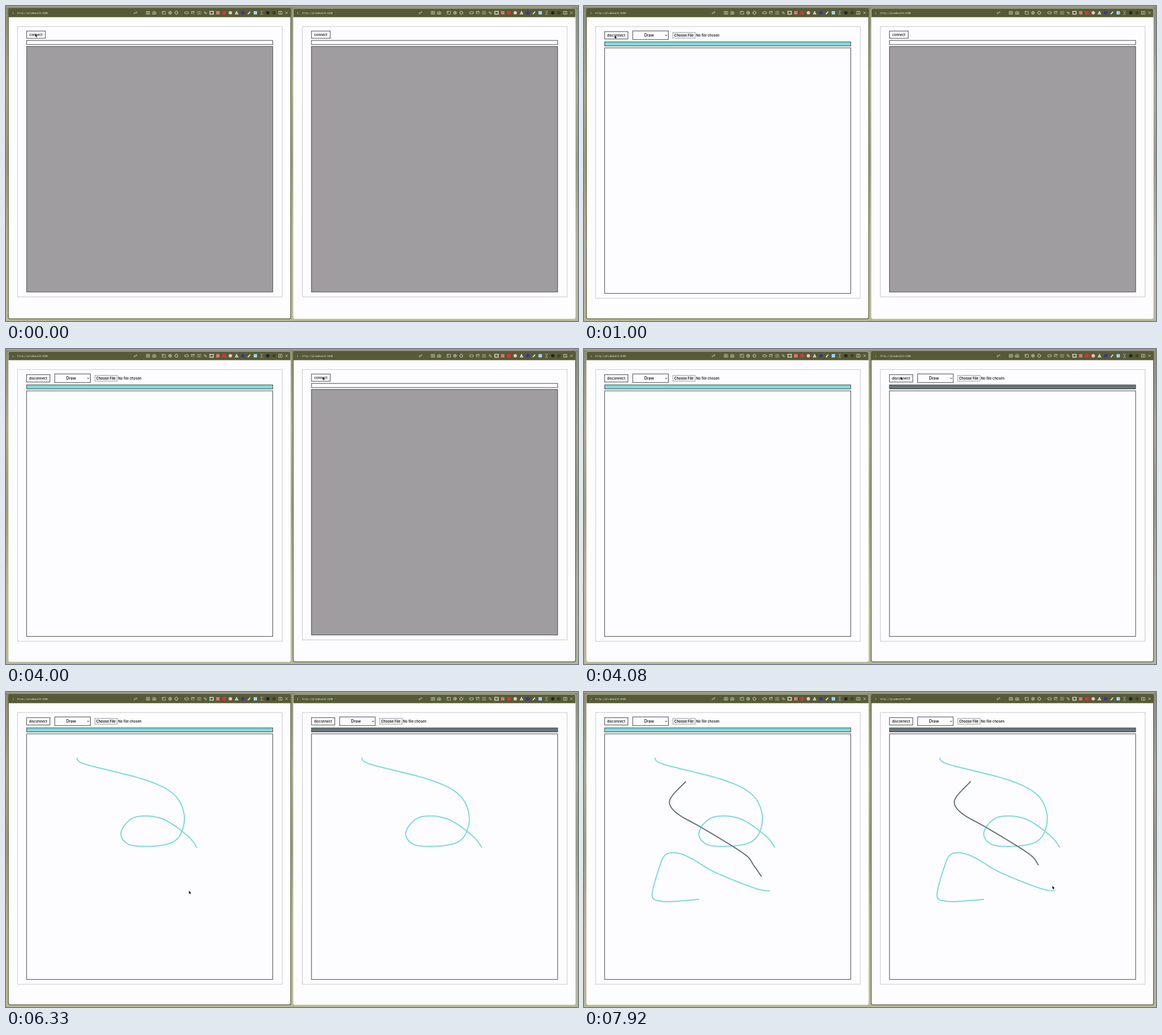
These frames come from a looping animation (1007 by 556 pixels, 8 s). An HTML page with a canvas:

```html
<!DOCTYPE html>
<html lang="en">
<head>
<meta charset="utf-8">
<title>Shared drawing board</title>
<style>
html, body { margin: 0; width: 100%; height: 100%; overflow: hidden; background: #fdfcfe; }
canvas { display: block; width: 1007px; height: 556px; }
</style>
</head>
<body>
<canvas id="stage"></canvas>
<script>
const W = 1007, H = 556, LOOP = 8000, STEP = 250 / 3, SHIFT = 501.5;
const TEAL = '#7edad8', SLATE = '#66747b', OLIVE = '#565a37', PAPER = '#fdfcfe', GREY = '#9f9d9f';
const JOIN = [410, 4080];
const REMOTE_LAG = 55, LOCAL_LAG = 115;
const SANS = 'Inter, sans-serif', MONO = '"DejaVu Sans Mono", monospace';

const canvas = document.getElementById('stage');
const ctx = canvas.getContext('2d');
const ratio = window.devicePixelRatio || 1;
canvas.width = W * ratio;
canvas.height = H * ratio;

const clamp = v => Math.max(0, Math.min(1, v));
const ease = v => v * v * (3 - 2 * v);
const mix = (a, b, v) => a + (b - a) * v;

// Smooth strokes through a few points, evenly spaced in time
const strokes = [
  { owner: 0, start: 5105, end: 6030, points: [
    [124.5, 116.5], [141, 127.5], [243, 154], [295, 180], [313.5, 217], [305, 254], [277, 269.5],
    [220, 270], [202, 248], [226, 220.8], [274, 223], [319, 253], [335.5, 273.5]] },
  { owner: 0, start: 6318, end: 6820, points: [
    [326, 350.5], [301, 346], [232, 318.5], [190, 294], [165, 284], [143, 287],
    [131, 313], [119.7, 359], [135, 368.6], [160, 369], [201.5, 365.5]] },
  { owner: 1, start: 7150, end: 7917, points: [
    [178.5, 158], [154, 184], [151.5, 200], [168, 217], [207, 239], [280, 284],
    [299, 306], [322.7, 341.7]] }
];

const progress = (s, time) => clamp((time - s.start) / (s.end - s.start)) * (s.points.length - 1);

// Catmull-Rom position at u, counted in points
function along({ points }, u) {
  const last = points.length - 1, i = Math.min(Math.floor(u), last - 1), v = u - i;
  const at = k => points[Math.max(0, Math.min(last, k))];
  const [a, b, c, d] = [at(i - 1), at(i), at(i + 1), at(i + 2)];
  return [0, 1].map(k => b[k] + v / 2 * (c[k] - a[k]
    + v * (2 * a[k] - 5 * b[k] + 4 * c[k] - d[k] + v * (3 * (b[k] - c[k]) + d[k] - a[k]))));
}

function penAt(stroke, time) {
  const [x, y] = along(stroke, progress(stroke, time));
  return [x + stroke.owner * SHIFT, y];
}

// Pointer stops: time, x, y
const stops = [[250, 51, 48.5], [900, 53.5, 51.5], [1500, 53.5, 51.5],
  [2750, 567, 34.5], [3800, 557, 48.5], [4250, 557, 48.5]];
for (const s of strokes) for (const time of [s.start, s.end]) stops.push([time, ...penAt(s, time)]);

function pointer(time) {
  const pen = strokes.find(s => time >= s.start && time <= s.end);
  if (pen) return penAt(pen, time);
  const next = stops.findIndex(s => s[0] > time);
  const b = next < 0 ? stops[stops.length - 1] : stops[next];
  const a = next > 0 ? stops[next - 1] : b;
  const v = a === b ? 0 : ease((time - a[0]) / (b[0] - a[0]));
  return [mix(a[1], b[1], v), mix(a[2], b[2], v)];
}

function rect(x, y, w, h, fill, line, width = 1) {
  if (fill) { ctx.fillStyle = fill; ctx.fillRect(x, y, w, h); }
  if (line) { ctx.strokeStyle = line; ctx.lineWidth = width; ctx.strokeRect(x, y, w, h); }
}

function label(text, x, y, { size = 6, color = '#000', align = 'left', font = SANS, weight = 500 } = {}) {
  ctx.font = `${weight} ${size}px ${font}`;
  ctx.textAlign = align;
  ctx.fillStyle = color;
  ctx.fillText(text, x, y);
}

function trace(d, x, y, color, width) {
  ctx.save();
  ctx.translate(x, y);
  ctx.strokeStyle = color;
  ctx.lineWidth = width;
  ctx.stroke(new Path2D(d));
  ctx.restore();
}

// Toolbar icons, each drawn around (x, 12)
const line = (d, color = '#d5d7c5', width = .75) => x => trace(d, x, 12, color, width);
const square = color => x => rect(x - 3, 9, 6, 6, color);
const dot = color => x => {
  ctx.fillStyle = color;
  ctx.beginPath();
  ctx.arc(x, 12, 3, 0, 7);
  ctx.fill();
};
const BOX = 'M-3-2.5H3V2.5H-3Z', RING = 'M2.7 0A2.7 2.7 0 1 1-2.7 0A2.7 2.7 0 1 1 2.7 0';
const iconRows = [
  [228, [line('M-.5 1L-1.5 2Q-3 2-2.5.5L-1-1M.5-1L1.5-2Q3-2 2.5-.5L1 1M-1 1L1-1')]],
  [250, [line(BOX + 'M-1-1H1V1H-1Z'), line('M-3-1.5H-1.5L-1-2.5H1L1.5-1.5H3V2.5H-3ZM-1-.5H1V1.2H-1Z')]],
  [278, [line(BOX + 'M-3-1.3H0'), line(RING + 'M-2.7 0H2.7M0-2.7V2.7'),
    line(RING + 'M0-3.5V-1.5M0 3.5V1.5M-3.5 0H-1.5M3.5 0H1.5')]],
  [318, [line('M-2-2H2V-1H3.5V1H2V2H-2V1H-3.5V-1H-2Z'), line('M-2.5-2.5H2.5V0M-2.5-2.5V1.5H0M-1-1H2M1 2H3'),
    line(BOX + 'M-1.5-1H1.5M-1.5 0H1.5M-1.5 1H1.5', '#a6a98e'), line('M-2.5-1L-1-2.5L2.5 1L1 2.5ZM-1 0L0-1M0 1L1 0'),
    line(BOX, '#d9d8ca', 1.5), square('#d77874'), square('#d93535'), dot('#efc3bd'),
    line('M-2 2L0-2L2 2Z', '#deded3', 1.5), dot('#3a329e'), line('M-2.2 2.5L2-2', '#eeeef5', 1.8),
    square('#9cd4ea'), line('M-2.5-3H2.5M-2.5 3H2.5M-1.5-2.5L1.5 2.5M1.5-2.5L-1.5 2.5', '#a6a98e'),
    dot('#25271f'), dot('#3f432a'), line(BOX + 'M0-2.5V2.5'), line('M-2.2-2.2L2.2 2.2M2.2-2.2L-2.2 2.2')]]
];

function titleBar() {
  rect(4, 4, 498, 15.7, OLIVE);
  const style = { size: 4.28, color: '#f0f0e6', font: MONO, weight: 400 };
  label('i', 11, 13.8, style);
  label('http://plumboard:4100', 20, 13.8, style);
  for (const [x, row] of iconRows) row.forEach((icon, i) => icon(x + 11 * i));
  for (const x of [270, 307.5]) rect(x, 9, .6, 6, '#6d714d');
}

function drawStroke(stroke, time) {
  if (time <= stroke.start) return;
  const end = progress(stroke, time);
  ctx.strokeStyle = stroke.owner ? SLATE : TEAL;
  ctx.lineWidth = 2;
  ctx.beginPath();
  for (let u = 0; u < end; u += .125) ctx.lineTo(...along(stroke, u));
  ctx.lineTo(...along(stroke, end));
  ctx.save();
  ctx.lineCap = ctx.lineJoin = 'round';
  ctx.stroke();
  ctx.restore();
}

function board(side, joined, time) {
  const edge = '#48484a', drop = joined ? 2.5 : 0, mid = { align: 'center' };
  rect(20, 35.7, 466, 477.2 + drop, null, '#c3c2c5', .9);
  if (joined) {
    rect(36, 44.7, 41, 13, PAPER, edge);
    label('disconnect', 56.4, 53.4, mid);
    rect(85.5, 43.5, 62.7, 15.2, PAPER, edge);
    label('Draw', 114.3, 53.6, { ...mid, size: 6.9 });
    trace('M-1.6-.8L0 .8L1.6-.8', 144.4, 51.2, '#111', 1);
    rect(156, 45.9, 39.5, 10.6, '#efeff0', '#858587', .7);
    label('Choose File', 175.6, 53.4, mid);
    label('No file chosen', 197, 53.4);
  } else {
    rect(36, 43.7, 33, 12.8, PAPER, edge);
    label('connect', 52.3, 52.2, mid);
  }
  rect(36, 60.3 + drop, 433.3, 7.2, !joined ? PAPER : side ? SLATE : TEAL, edge);
  rect(36, 70.9 + drop, 433.3, 433.4, joined ? PAPER : GREY, edge);
  if (joined) for (const s of strokes)
    drawStroke(s, time - (s.owner === side ? LOCAL_LAG : REMOTE_LAG));
}

function browser(side, active, time) {
  ctx.save();
  ctx.translate(side * SHIFT, 0);
  ctx.beginPath();
  ctx.roundRect(4.2, 4.2, 497, 548, 3);
  ctx.fillStyle = PAPER;
  ctx.fill();
  ctx.save();
  ctx.clip();
  titleBar();
  ctx.restore();
  ctx.beginPath();
  ctx.roundRect(4.2, 4.2, 497, 548, 3);
  ctx.strokeStyle = active ? OLIVE : '#d6d7c5';
  ctx.lineWidth = active ? 1.2 : .6;
  ctx.stroke();
  ctx.translate(.3, .5);
  board(side, time >= JOIN[side], time);
  ctx.restore();
}

function desktop() {
  const fill = ctx.createLinearGradient(0, 0, 0, H);
  ['#8c8e72', '#a8aa8b', '#9a9c7e', '#b3b594', '#b6b896'].forEach((c, i) => fill.addColorStop(i / 4, c));
  rect(0, 0, W, H, fill);
  rect(0, 0, W, 4, '#9b9c85');
  ctx.save();
  ctx.setLineDash([1, 1]);
  trace('M0 0H1007', 0, 3.5, '#55583c', 1);
  ctx.restore();
}

function arrow(x, y) {
  ctx.save();
  ctx.translate(x + .4, y + .6);
  const shape = new Path2D('M0 0V5.4L1.3 4.2L2.2 6.3L3.2 5.8L2.3 3.9H4Z');
  ctx.strokeStyle = '#fff';
  ctx.lineWidth = 1;
  ctx.stroke(shape);
  ctx.fillStyle = '#0b0b0b';
  ctx.fill(shape);
  ctx.restore();
}

function draw(now) {
  const time = Math.floor((now % LOOP + 4) / STEP) % 96 * STEP;
  const focus = (time > 3950 && time < 5080) || time > 7140 ? 1 : 0;
  ctx.setTransform(ratio, 0, 0, ratio, 0, 0);
  desktop();
  for (const side of [0, 1]) browser(side, focus === side, time);
  arrow(...pointer(time));
}

const begin = performance.now();
function tick() {
  draw(performance.now() - begin);
  requestAnimationFrame(tick);
}
tick();
</script>
</body>
</html>
```
